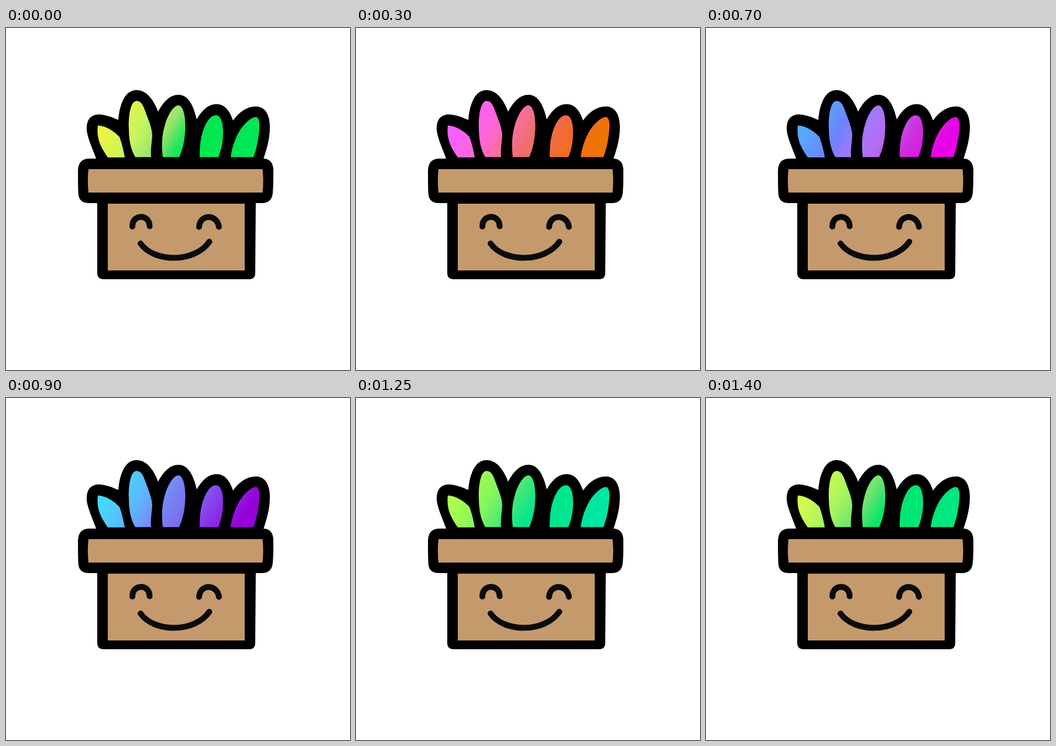
These frames come from a looping animation (588x584 px, 1.55 s). An HTML page:

```html
<!DOCTYPE html>
<html lang="en">
<head>
<meta charset="utf-8">
<title>Happy planter</title>
<style>
html, body { margin: 0; width: 100%; height: 100%; overflow: hidden; background: #fff; }
svg { display: block; width: 588px; height: 584px; }
</style>
</head>
<body>
<svg viewBox="0 0 588 584" xmlns="http://www.w3.org/2000/svg">
  <defs>
    <linearGradient id="hue" gradientUnits="userSpaceOnUse" x1="160" y1="168" x2="364" y2="295"></linearGradient>
  </defs>
  <!-- leaf silhouette -->
  <path d="M156 230L154 223C148 206 140 190 138 175C137 157 144 148 159 147.500C171 148 183 153 192 157C194 131 203 106 223 106C241 106 253 124 260 143C269 126 280 114 295 114C312 114 321 134 326 156C335 141 345 130 360 130C375 130 383 143 388 158C398 144 411 134 427 134C443 134 451 148 451 170C451 191 445 208 440 224V230Z"/>
  <g fill="url(#hue)">
    <path d="M157 166.500C168 166 185 176 194 186C198 197 201 209 203 221H174C163 205 154 190 157 166.500Z"/>
    <path d="M223 124.500C231 124 235 133 238 142C244 158 250 172 250 184C249 197 247 208 248 220.500H221C213 207 210 190 210 172C209 154 212 125 223 124.500Z"/>
    <path d="M295 132C303 134 306 148 306.500 164C307 185 303 206 296 220.500H268C266 203 266 185 271 168C276 149 286 132 295 132Z"/>
    <path d="M359 149C367 149 371 161 371 179C371 197 367 211 363 220.500H331C331 205 332 191 336 178C341 162 349 149 359 149Z"/>
    <path d="M427 152C432 152 434 160 433 172C432 190 428 207 423 220.500H384C386 205 391 190 399 176C407 163 419 152 427 152Z"/>
  </g>
  <!-- pot -->
  <path d="M156 290H427L426 418Q426 429 416 429H167Q156 429 156 418Z"/>
  <path d="M143 223H437C450 222 457 229 457 243C457 257 457 270 456 281C455 293 449 299 437 299H143C129 299 124 293 123.500 281C123 268 123 255 123 243C124 229 130 223 143 223Z"/>
  <g fill="#c49a6c">
    <path d="M174 300H408V414H174Z"/>
    <path d="M141 241H438.500C440 254 440 268 438.500 281H141C139.500 268 139.500 254 141 241Z"/>
  </g>
  <g fill="none" stroke="#0b0b0b" stroke-width="10" stroke-linecap="round">
    <path d="M216 339C216 317 245 317 245.500 338.500"/>
    <path d="M330 339.500C332 317 360 317 364 339.500"/>
    <path d="M230 368C253 401 323 401 347.500 365"/>
  </g>
</svg>
<script>
const LOOP = 1550;
const STEPS = [0, 50, 100, 150, 200, 300, 400, 500, 600, 700, 800, 900,
  1000, 1100, 1200, 1250, 1300, 1350, 1400];
const OFFSETS = [.05, .26, .42, .55, .7, .95];
const KEYS = [
  [0, "ecf545 c4f55f 9ae36e 1ae65c 00e74f 00e756"],
  [300, "f75fff ff66d6 f56f92 ee6f66 f26a3a ef7300"],
  [500, "9678ff bd6eff fb69f8 f55fe0 e8379e f00064"],
  [700, "55aaff 6f82ff a877fa b86af0 cc32de e800e8"],
  [900, "46d7ff 5fb4ff 7886f5 7a72ec 8741ee 9600d8"],
  [1250, "aaff4b 82f55f 3ce87a 06e68c 00e68c 00e6a5"],
  [1400, "d2fa50 a5f55f 6ee372 0ce66a 00e673 00e682"]
].map(([time, list]) => ({ time, colors: list.split(" ").map(toHsl) }));

function toHsl(hex) {
  const [r, g, b] = [0, 2, 4].map(i => parseInt(hex.slice(i, i + 2), 16) / 255);
  const max = Math.max(r, g, b), min = Math.min(r, g, b), d = max - min;
  const h = max === r ? (g - b) / d : max === g ? (b - r) / d + 2 : (r - g) / d + 4;
  const l = (max + min) / 2;
  return [(h * 60 + 360) % 360, d / (1 - Math.abs(2 * l - 1)) * 100, l * 100];
}

// The hue always travels backwards around the wheel.
function mix(a, b, k) {
  const turn = (a[0] - b[0] + 360) % 360;
  const h = (a[0] - turn * k + 360) % 360;
  const [s, l] = [1, 2].map(i => a[i] + (b[i] - a[i]) * k);
  return `hsl(${h.toFixed(2)}, ${s.toFixed(2)}%, ${l.toFixed(2)}%)`;
}

const gradient = document.getElementById("hue");
const stops = OFFSETS.map(offset => {
  const stop = document.createElementNS("http://www.w3.org/2000/svg", "stop");
  stop.setAttribute("offset", offset);
  return gradient.appendChild(stop);
});

function draw(ms) {
  const t = STEPS.filter(s => s <= ms % LOOP).pop();
  let i = 0;
  while (i < KEYS.length - 2 && KEYS[i + 1].time <= t) i++;
  const a = KEYS[i], b = KEYS[i + 1];
  const k = (t - a.time) / (b.time - a.time);
  stops.forEach((stop, n) => stop.setAttribute("stop-color", mix(a.colors[n], b.colors[n], k)));
}

let start = null;
function tick(now) {
  if (start === null) start = now;
  draw(Math.max(0, now - start));
  requestAnimationFrame(tick);
}
draw(0);
requestAnimationFrame(tick);
</script>
</body>
</html>
```
